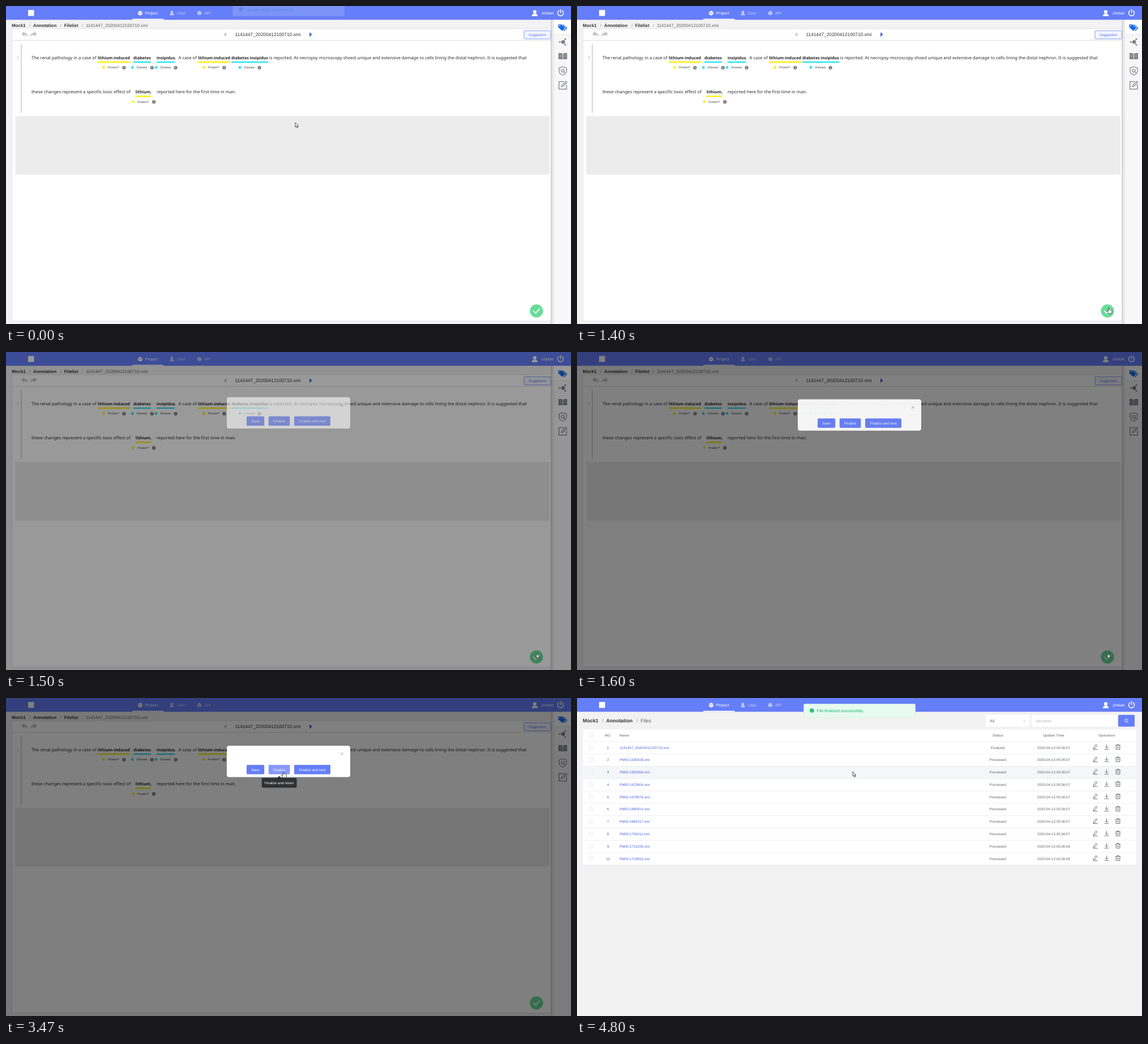
An HTML page for the animation above (4830 ms loop, 998 by 561 pixels).

```html
<!DOCTYPE html>
<html lang="en">
<head>
<meta charset="utf-8">
<title>Annotation tool</title>
<style>
html, body { margin: 0; width: 100%; height: 100%; overflow: hidden; background: #f2f2f2; }
svg { display: block; width: 998px; height: 561px; }
text { font-family: "Liberation Sans", Arial, sans-serif; text-rendering: geometricPrecision; white-space: pre; }
.doc { font-family: "Noto Sans", "Open Sans", sans-serif; }
</style>
</head>
<body>
<svg id="stage" viewBox="0 0 998 561" xmlns="http://www.w3.org/2000/svg"></svg>
<script>
const LOOP = 4830;
const BLUE = '#657ef9', CYAN = '#25e2f2', YELLOW = '#fdf000';

// ---------- drawing helpers ----------
const rect = (x, y, w, h, fill, more = '') =>
  `<rect x="${x}" y="${y}" width="${w}" height="${h}" fill="${fill}" ${more}/>`;
const line = (d, stroke, w = 1, more = '') =>
  `<path d="${d}" fill="none" stroke="${stroke}" stroke-width="${w}" ${more}/>`;
const shape = (d, fill, more = '') => `<path d="${d}" fill="${fill}" ${more}/>`;
const dot = (x, y, r, fill, more = '') => `<circle cx="${x}" cy="${y}" r="${r}" fill="${fill}" ${more}/>`;
const at = (x, y, inner) => `<g transform="translate(${x} ${y})">${inner}</g>`;
const group = (id, inner) => `<g id="${id}">${inner}</g>`;
// cy is the middle of the capitals
const text = (x, cy, s, size, fill, more = '') =>
  `<text x="${x}" y="${(cy + size * 0.36).toFixed(2)}" font-size="${size}" fill="${fill}" ${more}>${s}</text>`;
const MID = 'text-anchor="middle"', BOLD = 'font-weight="700"', ROUND = 'stroke-linecap="round" stroke-linejoin="round"';

// ---------- top bar ----------
function navBar() {
  const dim = '#c3ccfd';
  return rect(0, 0, 998, 24.3, BLUE) +
    rect(39, 7, 10.5, 10.5, '#fff') +
    rect(223, 22.6, 55.5, 1.9, '#fff') +
    at(237, 12.5, shape('M0-4 4-2 0 .2-4-2Z', '#fff') +
      shape('M-4-.9 0 1.3 4-.9V2L0 4.2-4 2Z', '#fff')) +
    text(245.8, 12.6, 'Project', 7.28, '#fff') +
    at(293, 12.5, dot(0, -1.6, 2.4, dim) + shape('M-3.8 3.7C-3.8 1.2-2.4.4 0 .4S3.8 1.2 3.8 3.7Z', dim)) +
    text(301.7, 12.6, 'User', 7.28, dim) +
    at(341.5, 12.5, shape('M0-4 3.6-2V2L0 4-3.6 2V-2Z', dim) + line('M-3.4-1.9 0 0 3.4-1.9M0 0V3.8', BLUE, .5)) +
    text(350, 12.6, 'API', 7.28, dim) +
    at(934, 12.5, dot(0, -2.2, 3.1, '#fff') + shape('M-5 5.4C-5 2-3 1 0 1S5 2 5 5.4Z', '#fff')) +
    text(946, 12.2, 'zhelan', 7.28, '#fff') +
    at(979.5, 12.3, line('M-3-4A5 5 0 1 0 3-4M0-6V-.4', '#fff', 1.5, ROUND));
}

// ---------- annotation page ----------
function tag(x, y, name, color, textX, infoX) {
  return dot(x, y, 2.3, color) + text(textX, y + .2, name, 5.1, '#333', 'class="doc"') +
    dot(infoX, y + .4, 3.1, '#777') +
    rect(infoX - .4, y - .2, .8, 2.2, '#fff') + rect(infoX - .4, y - 1.5, .8, .8, '#fff');
}

function sideBar() {
  const gray = '#7b7f86';
  return rect(963, 24.3, 35, 536.7, '#e9e9e9') + rect(968, 24.3, 30, 536.7, '#f7f7f7') +
    rect(968, 24.3, 30, 26, '#fff') + line('M968 50.5H998', '#ddd', .7) +
    line('M963.3 24.3V561', '#c9c9cf', 1.4) +
    at(983, 38, shape('M-7.5-5.5H-2L5 .8-.2 6-7.5-.2Z', '#1769e8') + line('M.4-5.3 7.4 1 2.6 5.9', '#1769e8', 1.4) +
      dot(-5, -3.2, 1, '#fff')) +
    at(983.5, 63.5, line('M0 0-5.5 0M0 0 4.5-5M0 0 4.5 5', gray, 1) + dot(.6, 0, 3.3, gray) +
      dot(-5.6, 0, 1.3, gray) + dot(4.5, -5.2, 1.4, gray) + dot(4.5, 5.2, 1.4, gray)) +
    at(983.5, 89, shape('M-7.6-5.5C-5-6.3-2-5.8-.5-4.7V5.5C-2 4.6-5 4.4-7.6 5ZM7.6-5.5C5-6.3 2-5.8.5-4.7V5.5C2 4.6 5 4.4 7.6 5Z', gray) +
      line('M-5.8-2.8-2.2-2.4M-5.8 0-2.2.4M5.8-2.8 2.2-2.4M5.8 0 2.2.4', '#f7f7f7', .6)) +
    at(983.5, 114.5, line('M0-7.3 6.5-5.2V0C6.5 4 3.5 6.2 0 7.5-3.5 6.2-6.5 4-6.5 0V-5.2Z', gray, 1.2) +
      line('M1.9 1.6 3.8 3.6', gray, 1.2) + dot(0, -.4, 2.6, 'none', `stroke="${gray}" stroke-width="1.2"`)) +
    at(983.5, 139.8, line('M2-6.5H-6.8V6.8H6.6V-1', gray, 1.3) + line('M-2.6 2.6-2 .2 5.4-7 7.3-5.1 0 2.2Z', gray, 1.1));
}

function editorPage() {
  const ink = '#2b2b2b', doc = 'class="doc"', strong = doc + ' ' + BOLD;
  const word = (x, y, s) => text(x, y, s, 7.18, '#222', strong);
  const run = (x, y, s) => text(x, y, s, 7.69, ink, doc);
  const under = (x1, x2, y, c) => rect(x1, y, x2 - x1, 2.3, c);
  const crumb = (x, s, more = BOLD, fill = '#303133') => text(x, 33.7, s, 7.8, fill, more);
  const undo = 'M-6-.4-.6-5V-2.2C3.5-2.2 5.6.3 5.6 4.6 4.4 2.2 2.6 1.3-.6 1.3V4.2Z';

  return rect(0, 0, 998, 561, '#f2f2f2') +
    crumb(10.3, 'Mock1') + crumb(41, '/', '', '#999') + crumb(48, 'Annotation') + crumb(96, '/', '', '#999') +
    crumb(102.8, 'Filelist') + crumb(134, '/', '', '#999') +
    crumb(141, '1141447_20200412100710.xmi', '', '#606266') +
    rect(10.3, 40, 952.5, 515.7, '#fff', 'stroke="#dcdcdc" stroke-width=".8"') +
    line('M10 60.5H963', '#dadada', .9) +
    at(33, 49.6, shape(undo, '#c4c4c4')) +
    at(48.7, 49.6, `<g transform="scale(-1 1)">${shape(undo, '#c4c4c4')}</g>`) +
    shape('M384.6 50.3 389.2 46.4V54.2Z', '#c4c7d0') +
    text(404.6, 50.2, '1141447_20200412100710.xmi', 8.28, '#303133') +
    shape('M540.8 50.3 536 46.2V54.4Z', '#4a69f0') +
    rect(915, 43.7, 47.2, 14.3, '#f3f5ff', `rx="1.5" stroke="${BLUE}" stroke-width=".8"`) +
    text(938.6, 50.8, 'Suggestion', 6.24, '#5a72ee', MID) +
    line('M27 67V188.5', '#c2c2c2', 1.3) +
    text(19, 91.5, '1', 7, '#8a8a8a', doc) +

    run(45, 91.4, 'The renal pathology in a case of') +
    word(162, 91.4, 'lithium-induced') + word(225, 91.4, 'diabetes') + word(266, 91.4, 'insipidus.') +
    run(304.6, 91.4, 'A case of') +
    word(339, 91.4, 'lithium-induced') + word(398, 91.4, 'diabetes insipidus') +
    run(464.8, 91.4, 'is reported. At necropsy microscopy shoed unique and extensive damage to cells lining the distal nephron. It is suggested that') +
    under(162, 218.7, 97.8, YELLOW) + under(225, 256, 97.8, CYAN) + under(266, 298, 97.8, CYAN) +
    under(339, 395.7, 97.8, YELLOW) + under(398, 463, 97.8, CYAN) +
    tag(172.3, 108.4, 'Protein*', YELLOW, 180, 208.4) + tag(223.3, 108.4, 'Disease', CYAN, 230.8, 257.8) +
    tag(265, 108.4, 'Disease', CYAN, 272.5, 299.6) + tag(349.5, 108.4, 'Protein*', YELLOW, 357, 385.4) +
    tag(413, 108.4, 'Disease', CYAN, 420.8, 447.6) +

    run(45, 151.7, 'these changes represent a specific toxic effect of') +
    word(228.8, 151.7, 'lithium,') +
    run(266, 151.7, 'reported here for the first time in man.') +
    under(228.7, 256, 158.2, YELLOW) +
    tag(225, 168.8, 'Protein*', YELLOW, 232.3, 261.2) +

    rect(16.5, 194, 943.5, 103.5, '#ececec') +
    dot(937, 538, 12, '#6bde9b', 'opacity=".35"') + dot(937, 538, 11.4, '#67dd99') +
    line('M931.8 538.2 935.6 541.9 942.4 534.6', '#fff', 1.7, ROUND) +
    sideBar();
}

// ---------- dialog ----------
function dialogBox() {
  const button = (id, x, w, s) => rect(x, 118, w, 16.5, BLUE, `id="${id}" rx="1.6"`) +
    text(x + w / 2, 126.3, s, 6.24, '#fff', MID);
  return rect(390, 84.3, 218, 55.2, '#fff', 'rx="4"') +
    line('M591.2 96.3 595.6 100.7M595.6 96.3 591.2 100.7', '#909399', .8) +
    button('save', 425, 31.2, 'Save') + button('done', 463.8, 37.6, 'Finalize') +
    button('next', 509, 64, 'Finalize and next');
}

const tooltip = () => rect(451.7, 141, 61.8, 17.2, '#303133', 'rx="2"') +
  shape('M478.9 141.2 482.6 137.4 486.3 141.2Z', '#303133') +
  text(482.6, 149.8, 'Finalize and return', 6.24, '#fff', MID);

// ---------- file list page ----------
const rowTop = i => 76.9 + 21.78 * i;

function actionIcons(y) {
  const c = '#606266';
  return at(915.5, y, line('M-3 1.3 1.2-4.4 3.2-2.9-1 2.8-3.4 3.5ZM-3.8 4.5H4.2', c, .9)) +
    at(935.5, y, line('M0-4.3V2M-2.8-.6 0 2.2 2.8-.6M-4 4.2H4', c, .9)) +
    at(955.5, y, line('M-4.3-3H4.3M-1.4-3V-4.4H1.4V-3M-3.4-3V4.3H3.4V-3M-1.1-.8V2.2M1.1-.8V2.2', c, .9));
}

function listPage() {
  const ids = [1335418, 1355356, 1675604, 1679576, 1680914, 1682217, 1700011, 1712226, 1719551];
  const names = ['1141447_20200412100710.xmi', ...ids.map(n => `PMID-${n}.xmi`)];
  const box = y => rect(21.6, y - 3.4, 6.8, 6.8, '#fff', 'rx="1" stroke="#dcdfe6" stroke-width=".7"');
  const head = (x, s, more = MID) => text(x, 65.6, s, 6.24, '#8b8f97', BOLD + ' ' + more);
  const crumb = (x, s, more = BOLD, fill = '#303133') => text(x, 40.3, s, 8.84, fill, more);

  let out = rect(0, 0, 998, 561, '#f2f2f2') +
    crumb(10.3, 'Mock1') + crumb(44.5, '/', '', '#999') + crumb(51.6, 'Annotation') +
    crumb(105.3, '/', '', '#999') + crumb(112.3, 'Files', '', '#606266') +
    rect(721.8, 29.8, 77.8, 20.8, '#fff', 'rx="2"') + text(729.3, 40.3, 'All', 7.28, '#606266') +
    line('M787.6 38.8 790.2 41.4 792.8 38.8', '#b4b8c0', .8) +
    rect(803, 29.8, 153, 20.8, '#fff', 'rx="2"') + text(810.6, 40.3, 'filename', 7.28, '#b7bac1') +
    rect(956, 29.8, 29, 20.8, BLUE, 'rx="1.5"') +
    dot(970.2, 39.7, 2.6, 'none', 'stroke="#fff" stroke-width=".9"') + line('M972.1 41.6 973.7 43.2', '#fff', .9) +
    rect(10.5, 55.5, 977, 239.2, '#fff') +
    rect(10.5, rowTop(2), 977, 21.78, '#f4f6f9', 'id="hover"') +
    box(65.4) + head(54.5, 'NO.') + head(75.3, 'Name', '') + head(743.5, 'Status') +
    head(842, 'Update Time') + head(935.7, 'Operation');

  names.forEach((name, i) => {
    const y = rowTop(i) + 10.4;
    out += line(`M10.5 ${rowTop(i)}H987.5`, '#e6e9f0', .7) + box(y - .3) +
      text(54.7, y, i + 1, 6.24, '#606266', MID) +
      text(75.3, y, name, 6.24, '#4a63d6') +
      text(743.3, y, i ? 'Processed' : 'Finalized', 6.24, '#606266', MID) +
      text(842, y, '2020-04-13 05:36:0' + (i < 8 ? 7 : 6), 6.24, '#606266', MID) +
      actionIcons(y - .9);
  });
  return out + line(`M10.5 ${rowTop(10)}H987.5`, '#e6e9f0', .7) +
    group('mask', rect(10, 55, 978, 240, '#fff', 'opacity=".9"') +
      line('', '#3f7df0', 1.2, 'id="spin" stroke-linecap="round"'));
}

const toastBox = s => rect(400.6, 10.5, 197, 23.6, '#e7faf0', 'rx="2" stroke="#cdf3de" stroke-width=".7"') +
  dot(414.9, 22.2, 3.6, '#14b562') + line('M413.2 22.3 414.5 23.5 416.7 21.1', '#fff', .8) +
  text(423.6, 22.4, s, 7.28, '#18b868');

// ---------- pointers, tip at 0,0 ----------
const arrow = shape('M0 0V8.1L1.9 6.4 3.2 9.4 4.6 8.8 3.3 5.9H5.7Z', '#fff', 'stroke="#222" stroke-width=".8" stroke-linejoin="round"');
const hand = shape('M-.9.8C-.9-.3.9-.3.9.8V3.8L1.2 3.1C1.8 2.8 2.5 3 2.6 3.7 3.2 3.3 4 3.6 4.1 4.2 4.9 4 5.4 4.4 5.4 5.2V7.6C5.4 8.6 4.7 9.2 4.5 10.4H-.6C-.9 9-2.6 7.6-3.3 6-3.5 5.1-2.3 4.8-1.7 5.6L-.9 6.4Z',
  '#fff', 'stroke="#222" stroke-width=".8" stroke-linejoin="round"');

document.getElementById('stage').innerHTML =
  group('editor', editorPage()) + group('list', listPage()) + navBar() +
  rect(0, 0, 998, 561, '#000', 'id="shade"') + group('dialog', dialogBox()) + group('tip', tooltip()) +
  group('oldToast', toastBox('Update entity successfully')) +
  group('newToast', toastBox('File finalized successfully.')) +
  group('arrow', arrow) + group('hand', hand);

const el = {};
document.querySelectorAll('[id]').forEach(n => el[n.id] = n);

// ---------- motion ----------
const clamp = v => Math.max(0, Math.min(1, v));
const phase = (t, start, length) => clamp((t - start) / length);
const smooth = u => u * u * (3 - 2 * u);

// cubic-bezier(.25, .1, .25, 1)
function ease(x) {
  let lo = 0, hi = 1;
  for (let i = 0; i < 20; i++) {
    const m = (lo + hi) / 2;
    const bx = .75 * m * (1 - m) + m ** 3;
    if (bx < x) lo = m; else hi = m;
  }
  return .3 * lo * (1 - lo) ** 2 + 3 * lo * lo * (1 - lo) + lo ** 3;
}

const OPEN = 1402, HOVER = 2650, SWITCH = 3600, LOADED = 3760;
const PATH = [[0, 511, 205.6], [180, 511, 205.6], [1030, 939.5, 532.4], [1420, 939.5, 532.4], [1500, 937, 532.2],
  [1640, 937, 532.2], [2260, 505, 148], [2400, 505, 148], [2680, 490, 130.3], [3500, 490, 130.3],
  [3680, 486, 129.6], [4200, 486, 129.6], [4450, 487.2, 130]];

function pointer(t) {
  const i = PATH.findIndex(p => p[0] > t);
  if (i < 0) return PATH[PATH.length - 1].slice(1);
  const [t0, x0, y0] = PATH[i - 1], [t1, x1, y1] = PATH[i];
  const u = smooth((t - t0) / (t1 - t0));
  return [x0 + (x1 - x0) * u, y0 + (y1 - y0) * u];
}

function show(node, opacity, dy = 0) {
  node.style.display = opacity > 0 ? '' : 'none';
  node.setAttribute('opacity', opacity);
  if (dy !== null) node.setAttribute('transform', `translate(0 ${dy})`);
}

function spinner(t) {
  const dt = t - 3830, r = 9.6;
  const a = (125 + dt * .18) * Math.PI / 180, b = a + clamp((115 + dt * .15) / 300) * 300 * Math.PI / 180;
  const p = v => `${499.5 + r * Math.cos(v)} ${175.5 + r * Math.sin(v)}`;
  el.spin.setAttribute('d', `M${p(a)}A${r} ${r} 0 ${b - a > Math.PI ? 1 : 0} 1 ${p(b)}`);
}

function draw(t) {
  const onList = t >= SWITCH;
  show(el.editor, onList ? 0 : 1);
  show(el.list, onList ? 1 : 0);

  const open = onList ? 0 : ease(phase(t, OPEN, 300));
  show(el.shade, onList ? 0 : .5 * ease(phase(t, OPEN, 200)));
  show(el.dialog, open, -10.4 * (1 - open));
  el.done.setAttribute('fill', t >= HOVER ? '#8699fb' : BLUE);
  show(el.tip, onList ? 0 : phase(t, HOVER + 60, 150));

  const left = 1 - phase(t, 0, 110);
  show(el.oldToast, .18 * left, -16.3 - 8 * (1 - left));
  const shown = ease(phase(t, 3520, 300));
  show(el.newToast, shown, -24 * (1 - shown));

  show(el.mask, 1 - ease(phase(t, LOADED, 300)));
  spinner(t);
  show(el.hover, t > LOADED + 300 ? 1 : 0);

  const [x, y] = pointer(t);
  const onHand = (t > 1010 && t < 1440) || (t > HOVER && t < SWITCH);
  show(el.arrow, onHand ? 0 : 1, null);
  show(el.hand, onHand ? 1 : 0, null);
  for (const n of [el.arrow, el.hand]) n.setAttribute('transform', `translate(${x} ${y})`);
}

const begin = performance.now();
function tick() {
  draw((performance.now() - begin) % LOOP);
  requestAnimationFrame(tick);
}
tick();
</script>
</body>
</html>
```
